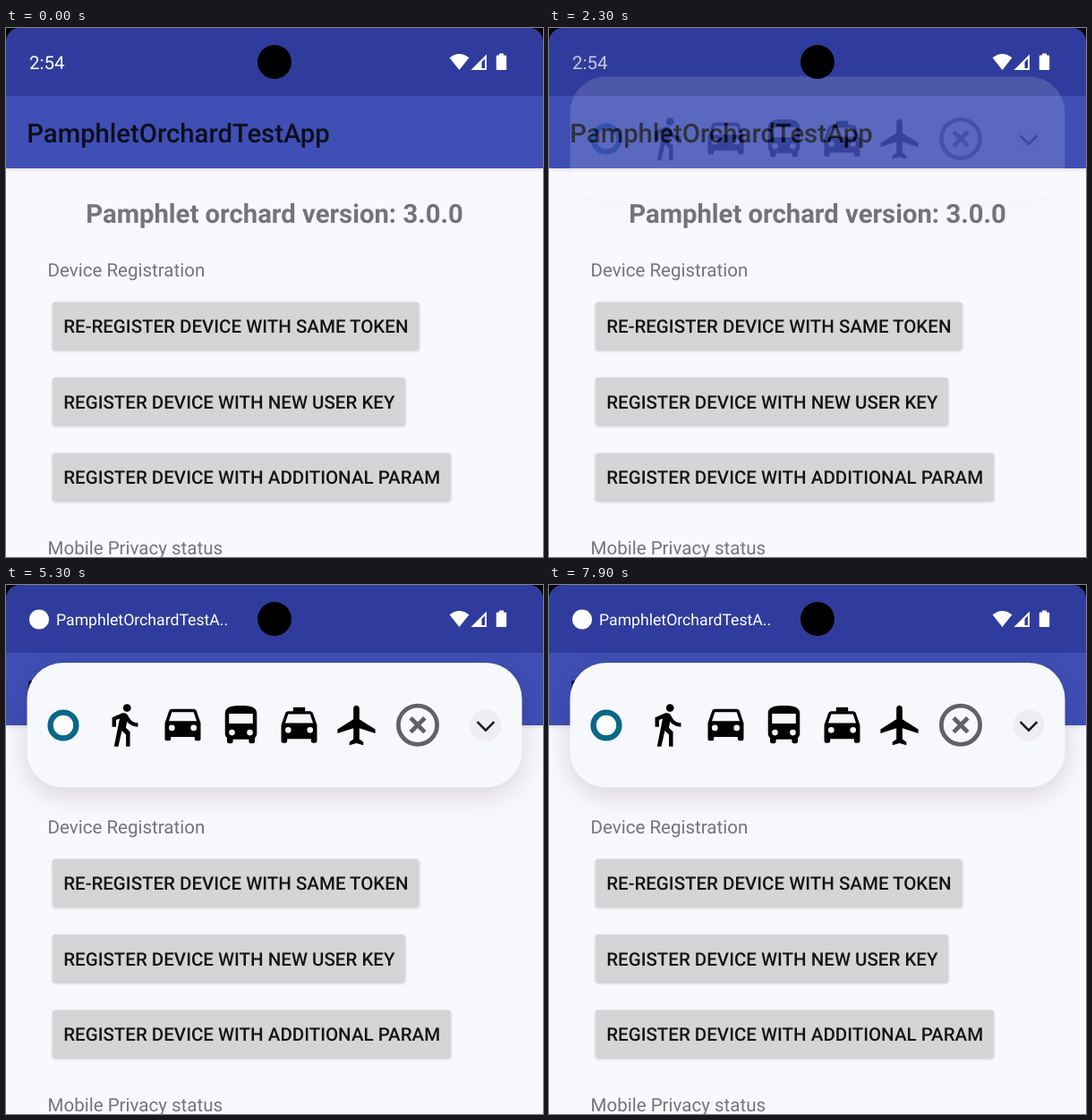
An HTML page for the animation above (8 s loop, 600 by 592 pixels).

```html
<!DOCTYPE html>
<html lang="en">
<head>
<meta charset="utf-8">
<title>Notification</title>
<style>
  html, body { margin: 0; width: 100%; height: 100%; overflow: hidden; background: #000; }
  svg { display: block; width: 100%; height: 100%; }
  text { font: 400 20.52px Roboto, sans-serif; text-rendering: geometricPrecision; white-space: pre; }
  .label { fill: #757478; }
  .button text { font-weight: 500; fill: #141316; }
  .button rect { fill: #d6d4d7; filter: drop-shadow(0 1.5px 1.5px rgba(0, 0, 0, .22)); }
  .title { font-size: 29.25px; font-weight: 500; }
  .heading { font-size: 29.25px; font-weight: 700; }
  .small { font-size: 17.65px; }
  .line { fill: none; stroke: #1c1b1f; stroke-width: 2.6; }
  #appbar { filter: drop-shadow(0 1px 2px rgba(0, 0, 0, .14)); }
  #panel { fill: #f7f8fc; filter: drop-shadow(0 8px 15px rgba(0, 0, 0, .14)); }
</style>
</head>
<body>
<svg viewBox="0 0 600 592">
  <defs>
    <path id="walk" d="M13.5 5.5c1.1 0 2-.9 2-2s-.9-2-2-2-2 .9-2 2 .9 2 2 2zM9.8 8.9L7 23h2.1l1.8-8 2.1 2v6h2v-7.5l-2.1-2 .6-3C14.8 12 16.8 13 19 13v-2c-1.9 0-3.5-1-4.3-2.4l-1-1.6c-.4-.6-1-1-1.7-1-.3 0-.5.1-.8.1L6 8.3V13h2V9.6z"/>
    <path id="car" fill-rule="evenodd" d="M18.92 6.01C18.72 5.42 18.16 5 17.5 5h-11c-.66 0-1.21.42-1.42 1.01L3 12v8q0 1 1 1h1q1 0 1-1v-1h12v1q0 1 1 1h1q1 0 1-1v-8zM5 11l1.5-4.5h11L19 11zM5 14.5a1.5 1.5 0 1 0 3 0a1.5 1.5 0 1 0-3 0zM16 14.5a1.5 1.5 0 1 0 3 0a1.5 1.5 0 1 0-3 0z"/>
    <g id="taxi"><use href="#car"/><path d="M9 3h6v2.2H9z"/></g>
    <path id="bus" fill-rule="evenodd" d="M4 16c0 .88.39 1.67 1 2.22V20q0 1 1 1h1q1 0 1-1v-1h8v1q0 1 1 1h1q1 0 1-1v-1.78c.61-.55 1-1.34 1-2.22V6c0-3.5-3.58-4-8-4s-8 .5-8 4zM6 6h12v5H6zM6 15.5a1.5 1.5 0 1 0 3 0a1.5 1.5 0 1 0-3 0zM15 15.5a1.5 1.5 0 1 0 3 0a1.5 1.5 0 1 0-3 0z"/>
    <path id="plane" d="M21 16v-2l-8-5V3.5c0-.83-.67-1.5-1.5-1.5S10 2.67 10 3.5V9l-8 5v2l8-2.5V19l-2 1.5V22l3.5-1 3.5 1v-1.5L13 19v-5.5z"/>
    <path id="cancel" fill="none" stroke="#626165" stroke-width="2" d="M3 12a9 9 0 1 0 18 0a9 9 0 1 0-18 0zM8.7 8.7l6.600 6.600M15.3 8.7l-6.600 6.600"/>
    <path id="bell" d="M7.6 4.1L6.1 2.6A10 10 0 0 0 2 10.5h2a8 8 0 0 1 3.6-6.4zM20 10.5h2a10 10 0 0 0-4.1-7.9l-1.5 1.5a8 8 0 0 1 3.6 6.4zM18 11c0-3.1-1.6-5.6-4.5-6.3V4a1.5 1.5 0 0 0-3 0v.7C7.6 5.4 6 7.9 6 11v5l-2 2v1h16v-1l-2-2zM10 20a2 2 0 0 0 4 0z"/>
  </defs>

  <path fill="#faf8fc" d="M0 76h600v516H0z"/>
  <path id="appbar" fill="#3f4fb5" d="M0 70h600v87H0z"/>
  <path fill="#303c9d" d="M0 76V15A15 15 0 0 1 15 0H585A15 15 0 0 1 600 15V76z"/>

  <text class="title" x="23.3" y="128" fill="#0d0f1c">PamphletOrchardTestApp</text>
  <text class="label heading" x="300" y="218" text-anchor="middle">Pamphlet orchard version: 3.0.0</text>
  <text class="label" x="46.6" y="278">Device Registration</text>
  <g id="buttons"></g>
  <text class="label" x="46.6" y="589">Mobile Privacy status</text>

  <g id="card">
    <rect id="panel" x="23.5" y="87" width="553" height="139.5" rx="40.5"/>
    <g id="collapsed"></g>
    <g id="expanded">
      <g fill="#59585c">
        <text class="small" x="99" y="135">PamphletOrchardTestApp</text>
        <circle cx="313" cy="129.5" r="2.3"/>
        <text class="small" x="321.5" y="135">now</text>
        <use href="#bell" transform="translate(363.2 119.4) scale(.8)"/>
      </g>
      <g id="bigIcons" fill="#141416"></g>
    </g>
    <g id="ends">
      <circle cx="64" r="14.4" fill="#fff" stroke="#0a6788" stroke-width="6.4"/>
      <circle cx="536" r="17.5" fill="#efedf1"/>
      <path id="down" class="line" d="M526.6-3.8L536 5.6L545.4-3.8"/>
      <path id="up" class="line" d="M526.6 3.8L536-5.6L545.4 3.8"/>
    </g>
  </g>

  <g fill="#fff">
    <text id="clock" x="26" y="46">2:54</text>
    <g id="chip">
      <circle cx="37" cy="38.5" r="11"/>
      <text class="small" x="56" y="45">PamphletOrchardTestA..</text>
    </g>
    <path d="M506.5 47L495.6 33.3Q506.5 24.5 517.4 33.3z"/>
    <path fill-rule="evenodd" d="M519.5 47L537 29.5V47zM531.5 38L535 34.5V45H531.5z"/>
    <rect x="551" y="28.5" width="5" height="4"/>
    <rect x="547.8" y="30.5" width="11.400" height="16.600" rx="1.200"/>
  </g>
  <circle cx="300" cy="38" r="19"/>
</svg>
<script>
const LOOP = 8000;
const $ = id => document.getElementById(id);

// label, top, width
const buttons = [
  ['RE-REGISTER DEVICE WITH SAME TOKEN', 306.7, 409.5],
  ['REGISTER DEVICE WITH NEW USER KEY', 391.2, 394],
  ['REGISTER DEVICE WITH ADDITIONAL PARAM', 475.7, 445],
];
$('buttons').innerHTML = buttons.map(([label, y, width]) =>
  `<g class="button"><rect x="52" y="${y}" width="${width}" height="53.5" rx="3"/>
   <text x="64.3" y="${y + 34.6}">${label}</text></g>`).join('');

// icon, its centre on a 24-unit grid, collapsed centre, expanded centre
const icons = [
  ['walk', 12.5, 12.25, 133, 157, 139.3, 201],
  ['car', 12, 13, 197.5, 156.6, 214.8, 200.5],
  ['bus', 12, 11.5, 262.5, 156.2, 291.3, 199.7],
  ['taxi', 12, 12, 327.5, 156.8, 368, 200.5],
  ['plane', 11.5, 12, 391.5, 157, 443.5, 200.7],
  ['cancel', 12, 12, 460, 156.7, 518.3, 200.5],
];
const place = (name, cx, cy, x, y, scale) =>
  `<use href="#${name}" transform="translate(${x} ${y}) scale(${name === 'cancel' ? 2.4 : scale}) translate(${-cx} ${-cy})"/>`;
$('collapsed').innerHTML = icons.map(([n, cx, cy, x, y]) => place(n, cx, cy, x, y, 2.22)).join('');
$('bigIcons').innerHTML = icons.map(([n, cx, cy, , , x, y]) => place(n, cx, cy, x, y, 2.42)).join('');

const ramp = (t, start, length) => Math.min(1, Math.max(0, (t - start) / length));
const mix = (a, b, k) => a + (b - a) * k;

// cubic-bezier(.4, 0, .2, 1)
function standardEase(x) {
  let lo = 0, hi = 1, u = x;
  for (let i = 0; i < 20; i++) {
    u = (lo + hi) / 2;
    const bx = 1.2 * u * (1 - u) ** 2 + 0.6 * u * u * (1 - u) + u ** 3;
    if (bx < x) lo = u; else hi = u;
  }
  return 3 * u * u * (1 - u) + u ** 3;
}

function draw(t) {
  const enter = ramp(t, 2270, 310);
  const slide = 1 - (1 - enter) ** 3;
  $('card').setAttribute('transform', `translate(0 ${mix(-45, 0, slide)})`);
  $('card').setAttribute('opacity', Math.min(1, enter * 1.5));
  $('clock').setAttribute('opacity', 1 - ramp(t, 2270, 110));
  $('chip').setAttribute('opacity', ramp(t, 2380, 160));

  const closing = t >= 7590;
  const step = closing ? ramp(t, 7590, 310) : ramp(t, 5685, 465);
  const open = closing ? 1 - step : step;
  const grown = closing ? 1 - standardEase(step) : standardEase(step);
  $('panel').setAttribute('height', mix(139.5, 183.5, grown));
  $('collapsed').setAttribute('opacity', (1 - open) ** 0.8);
  $('expanded').setAttribute('opacity', open);
  $('ends').setAttribute('transform', `translate(0 ${mix(157, 128.5, open)})`);
  $('down').setAttribute('opacity', 1 - open);
  $('up').setAttribute('opacity', open);
}

const began = performance.now();
function frame() {
  draw((performance.now() - began) % LOOP);
  requestAnimationFrame(frame);
}
frame();
</script>
</body>
</html>
```
